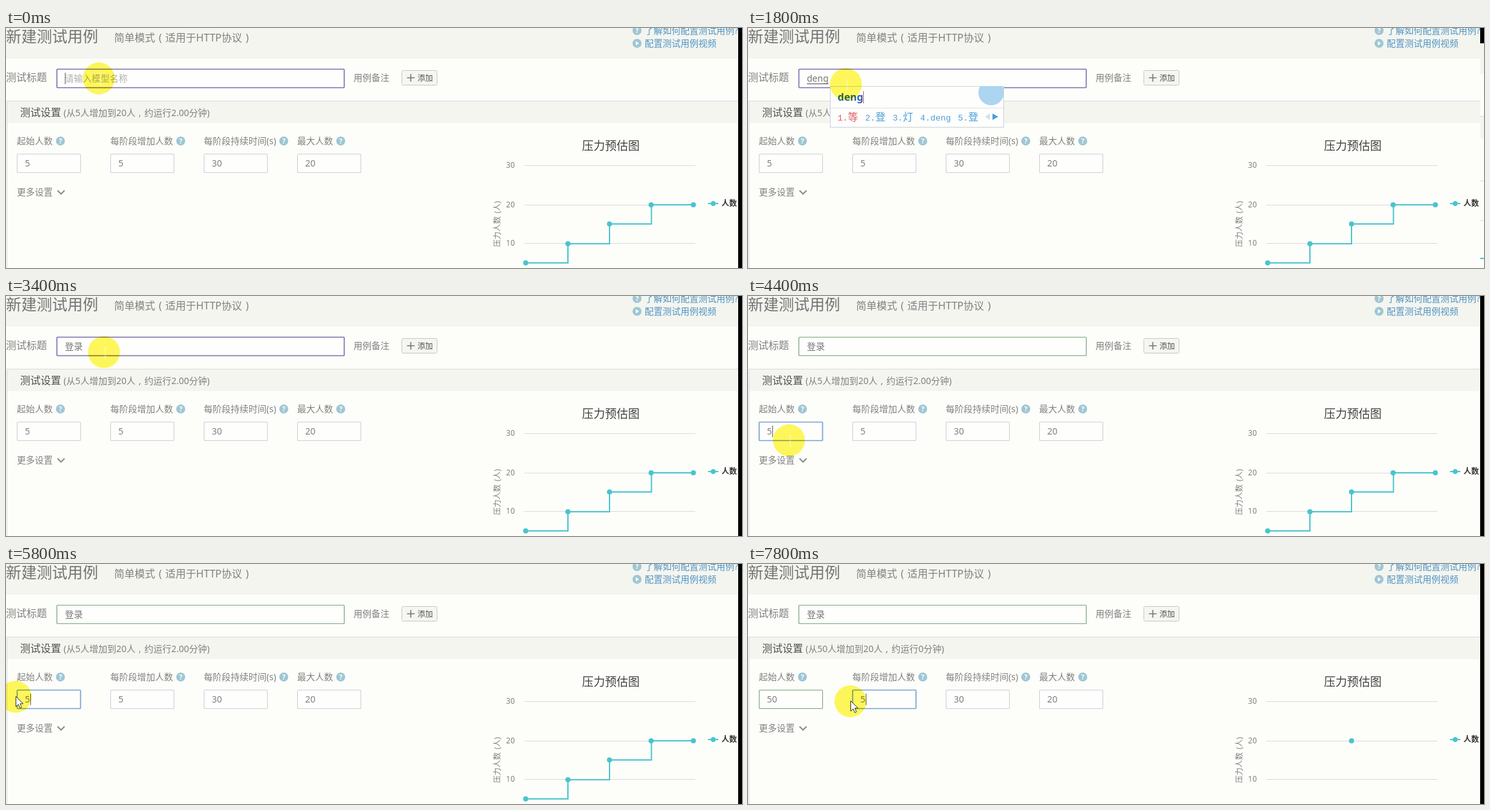
Recreate the animation shown at these times as an HTML page. Size 1150 by 376 pixels, loop 8 s.

```html
<!DOCTYPE html>
<html lang="zh-CN">
<head>
<meta charset="utf-8">
<title>新建测试用例</title>
<style>
html, body { margin: 0; width: 100%; height: 100%; overflow: hidden; background: #fdfefa; }
svg { display: block; width: 1150px; height: 376px; }
text { font: 14px "Noto Sans", "Noto Sans CJK SC", "Noto Sans CJK", sans-serif; fill: #808080; white-space: pre; word-spacing: 1.5px; }
.s12 { font-size: 12px; }
.s16 { font-size: 16px; }
.dark { fill: #505050; }
.link { fill: #4f93c4; }
.ime { font-family: "Liberation Mono", "Noto Sans CJK SC", "Noto Sans CJK", monospace; font-size: 13.33px; fill: #4b9ed6; }
.ime .han { font-size: 16px; }
.ime.first { fill: #dc5c62; }
#halo { mix-blend-mode: multiply; }
</style>
</head>
<body>
<svg id="stage" viewBox="0 0 1150 376" xmlns="http://www.w3.org/2000/svg">
  <defs>
    <clipPath id="page"><rect width="1144" height="376"/></clipPath>
    <clipPath id="popClip"><rect id="popClipBox" x="128" y="91" height="64"/></clipPath>
  </defs>
  <rect width="1150" height="376" fill="#fdfefa"/>
  <g clip-path="url(#page)">
    <rect width="1144" height="48" fill="#f4f5ef"/>
    <text x="0" y="22" style="font-size:24px;fill:#737373">新建测试用例</text>
    <text x="169" y="21" class="s16">简单模式 ( 适用于HTTP协议 )</text>
    <text x="998" y="9" class="link">了解如何配置测试用例?</text>
    <text x="998" y="29" class="link">配置测试用例视频</text>
    <circle cx="986" cy="24" r="7" fill="#9fc6d4"/>
    <path d="M984 20.5l5 3.5l-5 3.5z" fill="#fdfefa"/>

    <text x="0" y="83" class="s16">测试标题</text>
    <text x="543" y="83">用例备注</text>
    <rect x="618.5" y="66.5" width="55" height="23" rx="2" fill="#f5f6f0" stroke="#c8c8c6"/>
    <path d="M626.5 78h12M632.5 72v12" stroke="#777" stroke-width="1.6"/>
    <text x="643" y="83" class="s12 dark">添加</text>

    <rect x="1" y="114" width="1143" height="35" fill="#f4f5ef"/>
    <path d="M1.5 376V114.5H1144" fill="none" stroke="#d8dadc"/>
    <text x="22" y="138" class="s16 dark">测试设置</text>
    <text x="90" y="138" id="summary"></text>

    <g id="fields"></g>
    <text x="17" y="262">更多设置</text>
    <path d="M80.5 254.5l5.5 5.5l5.5-5.5" fill="none" stroke="#8c8c8c" stroke-width="2"/>

    <text x="945" y="191" text-anchor="middle" style="font-size:18px;fill:#404040">压力预估图</text>
    <g id="grid"></g>
    <text class="s12" text-anchor="middle" transform="translate(772 307) rotate(-90)">压力人数 (人)</text>
    <g id="plot"></g>
    <g fill="#4bc4cd" stroke="#4bc4cd">
      <path d="M1097 275h16" stroke-width="2"/><circle cx="1105" cy="275" r="3.5"/>
    </g>
    <text x="1118" y="279" class="s12" style="font-weight:700;fill:#333">人数</text>
  </g>

  <rect x="1144" width="6" id="edge" fill="#000"/>
  <g id="edgePage">
    <rect x="1144" y="24" width="6" height="48" fill="#f4f5ef"/>
    <rect x="1144" y="138" width="6" height="35" fill="#f4f5ef"/>
    <path d="M1144 138.5h6M1144 239.5h6M1144 301.5h6" stroke="#d8dadc"/>
    <path d="M1144 361h6" stroke="#4bc4cd" stroke-width="2"/>
  </g>

  <rect id="titleBox" x="79.5" y="64.5" width="449" height="29" rx="1" fill="#fefefd"/>
  <text id="title" x="92" y="84"></text>
  <path id="underline" stroke="#505050"/>
  <path id="caret" stroke="#606060"/>

  <g id="popup">
    <rect id="popBox" x="128.5" y="91.5" height="64" fill="#fefefd" stroke="#c9d3da"/>
    <circle id="badge" cy="101" r="20" fill="#acd5f0" clip-path="url(#popClip)"/>
    <path id="popRule" stroke="#dfe4e6"/>
    <text id="pinyin" x="140" y="114" style="font-size:16px;font-weight:700;fill:#2a66b4"></text>
    <path id="popCaret" stroke="#d0505c"/>
    <g id="words"></g>
    <path id="prev" fill="#cfe2ee"/>
    <path id="next" fill="#4b9ed6"/>
  </g>

  <circle id="halo" r="25" fill="#fff75c"/>
  <g id="pointer">
    <path id="beam" d="M-.5-7h2m1 0h2M2-7V9M-.5 9h2m1 0h2" fill="none" stroke="#fffde0" opacity=".75"/>
    <path id="arrow" d="M.5-.5v16l3.8-3.6l2.6 6l2.6-1.2l-2.6-5.8h5z" fill="#fff" stroke="#333"/>
  </g>
</svg>
<script>
const LOOP = 8000, STEP = 200;
const TEAL = "#4bc4cd", PAPER = "#fefefd";
const $ = id => document.getElementById(id);
const set = (el, attrs) => { for (const k in attrs) el.setAttribute(k, attrs[k]); return el; };
const add = (parent, tag, attrs, text) => {
  const el = set(document.createElementNS("http://www.w3.org/2000/svg", tag), attrs);
  if (text) el.textContent = text;
  return parent.appendChild(el);
};
const show = (el, on) => el.style.display = on ? "" : "none";
// Last [time, ...values] row already reached.
const at = (rows, t) => rows.reduce((now, row) => t >= row[0] ? row : now);

function help(x, y) {
  const parent = $("fields");
  add(parent, "circle", { cx: x, cy: y, r: 7, fill: "#9fc6d4" });
  add(parent, "text", { x, y: y + 4, "text-anchor": "middle", style: "font-size:11px;font-weight:700;fill:#fdfefa" }, "?");
}

const labels = [["起始人数", 85], ["每阶段增加人数", 273], ["每阶段持续时间(s)", 434], ["最大人数", 523]];
const values = ["5", "5", "30", "20"];
help(986, 4);
const fields = labels.map(([label, iconX], i) => {
  const x = 17 + 146 * i;
  add($("fields"), "text", { x, y: 182 }, label);
  help(iconX, 177);
  const box = add($("fields"), "rect", { x: x + .5, y: 197.5, width: 99, height: 29, rx: 1, fill: PAPER });
  const mark = add($("fields"), "rect", { x: x + 12, y: 203, width: 9, height: 18, fill: "#7c8488" });
  const text = add($("fields"), "text", { x: x + 12.5, y: 217 }, values[i]);
  return { x, box, mark, text };
});

[[30, 215.5], [20, 277.5], [10, 337.5]].forEach(([n, y]) => {
  add($("grid"), "path", { d: `M810 ${y}H1077`, stroke: "#d9dadb" });
  add($("grid"), "text", { x: 795, y: y + 3, "text-anchor": "end", class: "s12" }, n);
});

const dot = (parent, x, y) => add(parent, "circle", { cx: x, cy: y, r: 4, fill: TEAL });
const stairs = add($("plot"), "g", {});
add(stairs, "path", { d: "M812 368H878V338H943V307H1008.5V277H1074", fill: "none", stroke: TEAL, "stroke-width": 2 });
[[812, 368], [878, 338], [943, 307], [1008, 277], [1074, 277]].forEach(p => dot(stairs, ...p));
const single = dot($("plot"), 943, 277);

const typing = [
  [0, "", ""],
  [1200, "d", "的 都 大 到 点"],
  [1400, "de", "的 得 德 地 de"],
  [1600, "den", "扽 等 登 den 灯"],
  [1800, "deng", "等 登 灯 deng 登"],
  [2200, "dengl", "登录 登陆 等了 等来"],
  [2400, "denglu", "登录 登陆 灯路 等路"],
  [2600, "", ""]
];
const path = [
  [0, 145, 79], [200, 145, 79], [600, 153, 88], [3500, 153, 88], [4300, 64, 226],
  [4600, 64, 226], [5600, 15, 208], [6200, 15, 208], [6800, 186, 218],
  [7000, 166, 222], [7400, 160, 215], [8000, 160, 215]
];
const TITLE_END = 2600, FIRST = 4200, TYPED = 6200, SECOND = 6800, DROP = 7400;

function position(t) {
  const i = path.findIndex((p, n) => t < path[n + 1][0]);
  const [t0, x0, y0] = path[i], [t1, x1, y1] = path[i + 1];
  const u = (t - t0) / (t1 - t0), e = u * u * (3 - 2 * u);
  return [x0 + (x1 - x0) * e, y0 + (y1 - y0) * e];
}

function drawPopup(pinyin, list) {
  show($("popup"), pinyin);
  show($("underline"), pinyin);
  if (!pinyin) return;
  $("pinyin").textContent = pinyin;
  const caretX = 140.5 + Math.round($("pinyin").getComputedTextLength());
  set($("popCaret"), { d: `M${caretX} 99v19` });
  set($("underline"), { d: `M92 87.5h${$("title").getComputedTextLength()}` });
  $("words").replaceChildren();
  let x = 140;
  list.split(" ").forEach((word, i) => {
    const latin = /[a-z]/.test(word);
    const item = add($("words"), "text", { x, y: 145, class: i ? "ime" : "ime first" }, `${i + 1}.`);
    add(item, "tspan", latin ? {} : { class: "han" }, word);
    x += 16 + word.length * (latin ? 8 : 16) + 11;
  });
  const right = x + 28;
  set($("popBox"), { width: right - 128 });
  set($("popClipBox"), { width: right - 128 });
  set($("badge"), { cx: right - 19 });
  set($("popRule"), { d: `M129 125.5H${right}` });
  set($("prev"), { d: `M${right - 29} 139l8-5v10z` });
  set($("next"), { d: `M${right - 8} 139l-9-5v10z` });
}

function drawCaret(t, pinyin) {
  const first = t >= FIRST && t < SECOND, second = t >= DROP;
  const since = second ? DROP : first ? (t >= TYPED ? TYPED : FIRST) : t >= TITLE_END ? TITLE_END : 0;
  const on = (t - since) % 1200 < 600 && !pinyin && !(t >= SECOND && t < DROP);
  show($("caret"), on);
  const text = second ? fields[1].text : first ? fields[0].text : $("title");
  const empty = t < TITLE_END;
  const x = Math.round(+text.getAttribute("x") + (empty ? 0 : text.getComputedTextLength())) + .5;
  set($("caret"), { d: `M${x} ${first || second ? 203 : 70}v18` });
}

function drawPointer(t) {
  const [x, y] = position(t);
  const inside = (left, top, w) => x >= left && x <= left + w && y >= top && y <= top + 30;
  const overInput = inside(79, 64, 450) || fields.some(f => inside(f.x, 197, 100));
  set($("halo"), { cx: x, cy: y });
  set($("pointer"), { transform: `translate(${x} ${y})` });
  show($("beam"), overInput);
  show($("arrow"), !overInput);
}

function render(ms) {
  const t = Math.floor(ms % LOOP / STEP) * STEP;
  const [, pinyin, list] = at(typing, t);
  const done = t >= TITLE_END, changed = t >= SECOND;

  $("title").textContent = done ? "登录" : pinyin || "请输入模型名称";
  $("title").style.fill = done || pinyin ? "#757575" : "#b0b0b0";
  set($("titleBox"), t < FIRST
    ? { stroke: "#7c6fae", "stroke-width": 1.6 }
    : { stroke: "#7ba47c", "stroke-width": 1.2 });
  drawPopup(pinyin, list);

  const focus = t >= SECOND ? 1 : t >= FIRST ? 0 : -1;
  fields[0].text.textContent = t >= TYPED ? "50" : "5";
  fields.forEach((f, i) => {
    const selected = i === 1 && changed && t < DROP;
    const stroke = i === focus ? "#7ba0d0" : i === 0 && changed ? "#7ba47c" : "#cdd0da";
    set(f.box, { stroke, "stroke-width": i === focus ? 1.7 : 1.1 });
    show(f.mark, selected);
    f.text.style.fill = selected ? PAPER : "";
  });

  $("summary").textContent = changed ? "(从50人增加到20人 , 约运行0分钟)" : "(从5人增加到20人 , 约运行2.00分钟)";
  show(stairs, !changed);
  show(single, t >= DROP);

  const open = t >= 1400 && t < 2800;
  set($("edge"), { height: open ? 24 : 376 });
  show($("edgePage"), open);
  drawCaret(t, pinyin);
  drawPointer(t);
}

const start = performance.now();
function tick() {
  render(performance.now() - start);
  requestAnimationFrame(tick);
}
tick();
</script>
</body>
</html>
```
